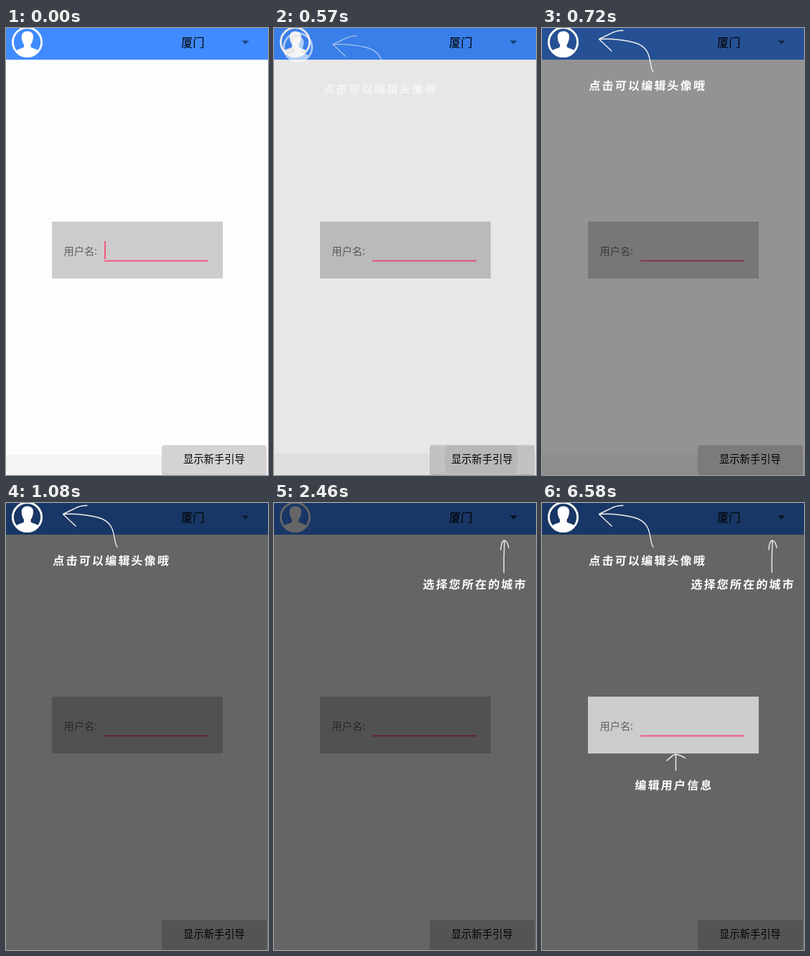
Recreate the animation shown at these times as an HTML page. Size 365 by 621 pixels, loop 8 s.

```html
<!DOCTYPE html>
<html lang="zh-CN">
<head>
<meta charset="utf-8">
<style>
html, body { margin: 0; width: 100%; height: 100%; overflow: hidden; background: #fdfdfd; }
svg { display: block; width: 100vw; height: 100vh; }
text { font-family: "Noto Sans CJK SC", "Noto Sans CJK", sans-serif; }
.hint text { font-size: 16px; font-weight: 700; letter-spacing: 2.2px; fill: #fff; }
.hint path { fill: none; stroke: #eee; stroke-width: 1.4; stroke-linecap: round; stroke-linejoin: round; }
</style>
</head>
<body>
<svg viewBox="0 0 365 621" xmlns="http://www.w3.org/2000/svg">
  <defs>
    <clipPath id="buttonClip"><rect x="218" y="579.5" width="144" height="39.5" rx="2"/></clipPath>
    <g id="avatar">
      <circle cx="29.5" cy="19.6" r="20.1" fill="none" stroke="#fff" stroke-width="2.8"/>
      <path fill="#fff" d="M14 32Q16 29.500 21 28.500L25 26.500V23Q22 19 21.700 12Q22 4.500 29.800 4.500Q37.600 4.500 38 12Q37.600 19 34.500 23V26.500L38.500 28.500Q43.500 29.500 45.500 32Q39 38.800 29.500 38.800Q20 38.800 14 32Z"/>
    </g>
    <path id="drop" d="M328.500 17.500h10l-5 5z"/>
    <g id="panel">
      <rect x="64" y="269" width="238" height="79" fill="#cdcccd"/>
      <text x="80.500" y="315.300" font-size="14.200" fill="#616163">用户名:</text>
      <rect x="137" y="322.500" width="145" height="2" fill="#f4587f"/>
    </g>
  </defs>

  <rect width="365" height="621" fill="#fdfdfd"/>
  <rect id="strip" width="365" height="30" fill="#f4f4f4"/>
  <rect width="365" height="44" fill="#3f8bff"/>
  <use href="#avatar"/>
  <text x="244" y="26" font-size="16.300">厦门</text>
  <use href="#drop" fill="#1d4278"/>
  <use href="#panel"/>
  <rect id="caret" x="137" y="296" width="2" height="25" fill="#f4587f"/>
  <rect x="217" y="580" width="146" height="41" rx="3" fill="#000" opacity=".16"/>
  <rect x="218" y="579.500" width="144" height="39.500" rx="2" fill="#d5d3d5"/>
  <circle id="ripple" cx="288.500" cy="599" opacity=".06" clip-path="url(#buttonClip)"/>
  <text x="247" y="604" font-size="14.300">显示新手引导</text>

  <rect id="dim" width="365" height="621"/>
  <g id="guide">
    <g id="hint0">
      <use href="#avatar"/>
      <g class="hint">
        <path d="M113 3.500Q104 3 95 8L79.500 15.500L97 32M79.500 15.500Q104 14 128 20C156 27 148 53 155 61"/>
        <text transform="translate(65 85.500) skewX(-4)">点击可以编辑头像哦</text>
      </g>
    </g>
    <g id="hint1">
      <use href="#drop" fill="#0a1422"/>
      <g class="hint">
        <path d="M320.300 96.500V75L321 53M316 65Q316.500 54 320.500 52Q325 52 327 62"/>
        <text transform="translate(207 119) skewX(-4)">选择您所在的城市</text>
      </g>
    </g>
    <g id="hint2">
      <use href="#panel"/>
      <g class="hint">
        <path d="M186.500 371.500V350M174 358Q182 350 186 349Q193 350 199.500 354.500"/>
        <text transform="translate(129 397.500) skewX(-4)">编辑用户信息</text>
      </g>
    </g>
  </g>
</svg>
<script>
const LOOP = 8000;
const $ = id => document.getElementById(id);
const set = (id, attrs) => {
  for (const k in attrs) $(id).setAttribute(k, attrs[k]);
};
const show = (id, on) => set(id, { visibility: on ? "visible" : "hidden" });

// The opening dialog: dim level, guide opacity and scale, ripple radius
const opening = [
  { at: 0, dim: 0, alpha: 0, scale: 1, ripple: 0 },
  { at: 450, dim: .025, alpha: 0, scale: 1, ripple: 32 },
  { at: 570, dim: .085, alpha: .6, scale: .975, ripple: 51 },
  { at: 720, dim: .42, alpha: 1, scale: 1, ripple: 0 },
  { at: 840, dim: .6, alpha: 1, scale: 1, ripple: 0 }
];

function draw(t) {
  const s = opening.findLast(o => t >= o.at);
  const step = t < 2460 ? 0 : t < 4500 ? 1 : t < 6580 ? 2 : 3;

  set("dim", { opacity: s.dim });
  set("guide", {
    opacity: s.alpha,
    transform: `translate(182.5 310.5) scale(${s.scale}) translate(-182.5 -310.5)`
  });
  set("ripple", { r: s.ripple });
  set("strip", { y: t < 450 ? 593 : 591 });
  show("strip", t < 840);
  show("caret", t < 450);
  // The last step shows every hint at once
  for (let i = 0; i < 3; i++) show("hint" + i, step === 3 || step === i);
}

function tick() {
  draw(performance.now() % LOOP);
  requestAnimationFrame(tick);
}
tick();
</script>
</body>
</html>
```
